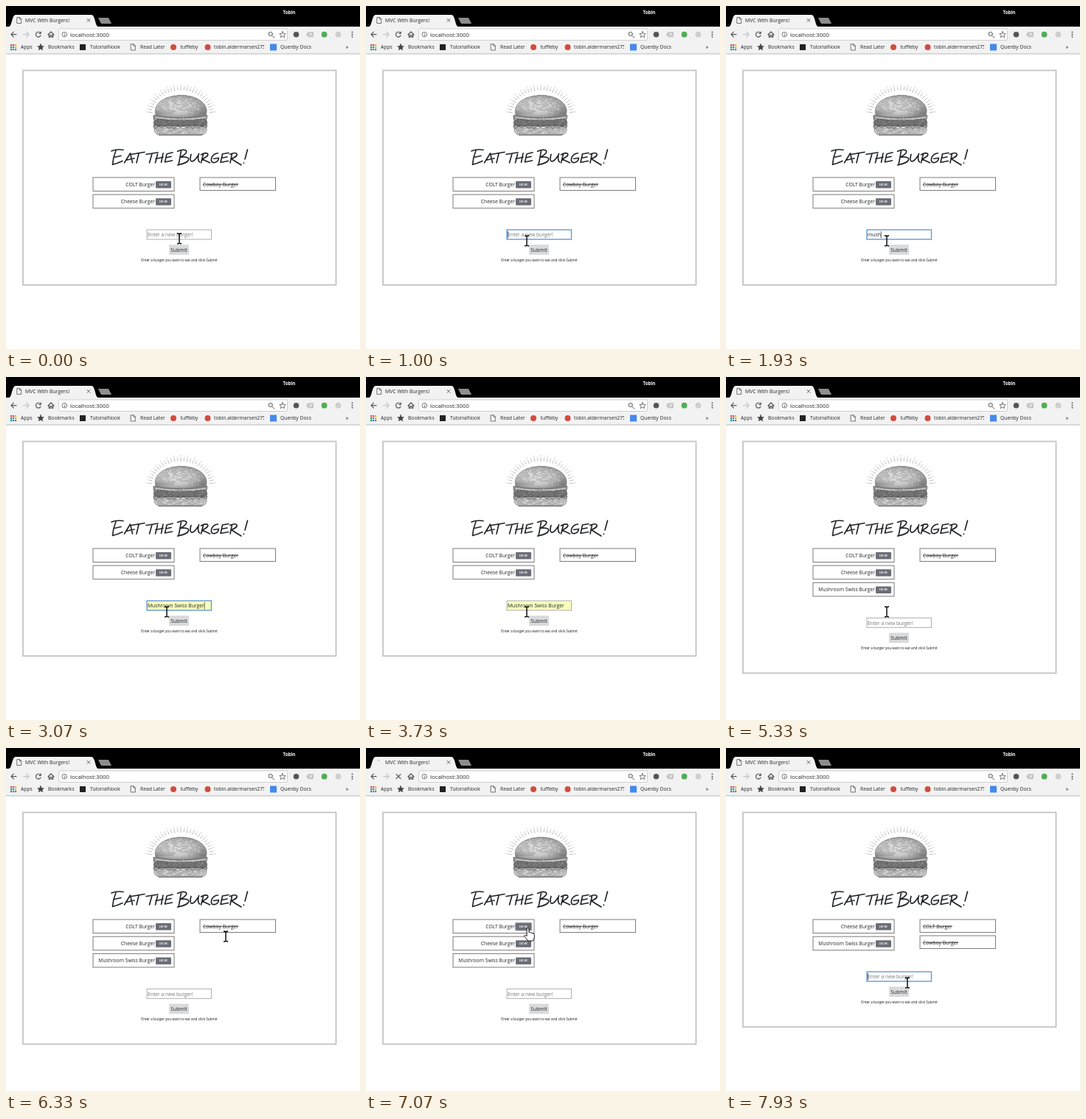
An HTML page that plays this animation: 480 px wide and 466 px high, repeating every 8000 ms.

```html
<!DOCTYPE html>
<html lang="en">
<head>
<meta charset="utf-8">
<title>MVC With Burgers!</title>
<style>
  html, body { margin: 0; width: 100%; height: 100%; overflow: hidden; background: #fff; }
  svg { display: block; width: 100vw; height: 100vh; }
  text { font-family: "Open Sans", "Noto Sans", sans-serif; font-size: 6.75px; fill: #24272b; }
  .line { fill: none; stroke: #555; stroke-width: 1.2; stroke-linecap: round; stroke-linejoin: round; }
  .item { fill: #fff; stroke: #7c7c7c; }
  .eat { font-size: 3.3px; font-weight: 600; fill: #fff; text-anchor: middle; }
  .struck { text-decoration: line-through; }
  .lettering { fill: none; stroke: #202327; stroke-width: 1.65; stroke-linecap: round; stroke-linejoin: round; }
</style>
</head>
<body>
<svg id="stage" viewBox="0 0 480 466" preserveAspectRatio="none">
  <defs>
    <radialGradient id="bun" cx=".42" cy=".45" r=".62">
      <stop offset="0" stop-color="#eee"/><stop offset=".6" stop-color="#c4c4c4"/><stop offset="1" stop-color="#858585"/>
    </radialGradient>
    <clipPath id="accountClip"><rect x="280" y="48" width="70" height="16"/></clipPath>
  </defs>

  <g id="browser">
    <rect width="480" height="28" fill="#000"/>
    <text x="375.5" y="11.2" style="font-size:6.2px;font-weight:700;fill:#fff">Tobin</text>
    <path d="M4 28C8 28 8 12 13 12H116C121 12 121 28 125 28Z" fill="#f2f2f2"/>
    <path d="M125 16H139L143 24H129Z" fill="#8d8d8d"/>
    <path class="line" d="M110 17.4l4 4m0-4l-4 4" style="stroke-width:.9"/>
    <text x="26" y="22" style="font-size:6.9px">MVC With Burgers!</text>
    <rect y="28" width="480" height="37" fill="#f2f2f2"/>
    <path d="M0 65H480" stroke="#b9b9b9"/>
    <path class="line" d="M14 38.7H7m3.3-3.5L7 38.7l3.3 3.5"/>
    <path class="line" d="M24 38.7H31m-3.3-3.5l3.3 3.5-3.3 3.5" style="stroke:#c4c4c4"/>
    <path class="line" d="M57 39l4-4 4 4M58.3 38.5V42.3H60v-2.6h2v2.6h1.7V38.5"/>
    <rect x="71.500" y="31" width="310" height="15.500" rx="1.500" fill="#fff" stroke="#c6c6c6" stroke-width=".8"/>
    <circle class="line" cx="79.300" cy="38.700" r="3.300" style="stroke-width:.8"/>
    <path class="line" d="M79.3 38.6V40.6M79.3 36.8v.1" style="stroke-width:.9"/>
    <text x="87" y="41.500" style="font-size:7.85px">localhost:3000</text>
    <path class="line" d="M361 40.500l3 2.700M361.300 38a2.600 2.600 0 1 1-5.200 0a2.600 2.600 0 1 1 5.200 0" style="stroke-width:1"/>
    <path id="star" class="line" d="M375 34.600l1.200 2.900 3 .2-2.300 2 .8 3-2.700-1.700-2.700 1.700.8-3-2.300-2 3-.2Z" style="stroke-width:.8"/>
    <circle cx="393.500" cy="38.700" r="3.800" fill="#555"/>
    <path d="M407 38.700l3-3.500h7v7h-7Z" fill="#c3c3c3"/>
    <path d="M411.500 37l3.400 3.400m0-3.400l-3.400 3.400" stroke="#fff"/>
    <circle cx="431.600" cy="38.700" r="3.900" fill="#50ad55"/>
    <circle cx="450.500" cy="38.700" r="3.900" fill="#cfcfcf"/>
    <g fill="#555"><circle cx="469.500" cy="35.600" r="1"/><circle cx="469.500" cy="38.700" r="1"/><circle cx="469.500" cy="41.800" r="1"/></g>
    <g id="apps"></g>
    <use href="#star" transform="translate(-328 17)"/>
    <path d="M47 51.600l1.200 2.900 3 .2-2.300 2 .8 3-2.700-1.700-2.700 1.700.8-3-2.300-2 3-.2Z" fill="#444"/>
    <rect x="100" y="52" width="8" height="8" fill="#222"/>
    <circle cx="227" cy="56" r="4" fill="#d34b3f"/>
    <circle cx="273.500" cy="56" r="4" fill="#d34b3f"/>
    <rect x="358" y="51.500" width="9" height="9" fill="#4688ee"/>
    <path class="line" d="M169.500 51.800H173L175.300 54V60H169.500ZM173 51.800V54h2.300" style="stroke-width:.8"/>
    <text x="20" y="58.400">Apps</text>
    <text x="57" y="58.400">Bookmarks</text>
    <text x="114" y="58.400">TutorialNook</text>
    <text x="182" y="58.400">Read Later</text>
    <text x="236.500" y="58.400">tuffleby</text>
    <text x="282" y="58.400" clip-path="url(#accountClip)">tobin.aldermarsen275</text>
    <text x="372" y="58.400">Quenby Docs</text>
    <text x="460.500" y="58.400" style="font-size:8px">»</text>
    <g id="idle">
      <path class="line" d="M15.200 15.500H18.500L20.700 17.700V23.500H15.200ZM18.500 15.500v2.200h2.200" style="stroke-width:.8"/>
      <path class="line" d="M46.600 36.600A3.400 3.400 0 1 0 47 40M47.200 35V37.500H44.700"/>
    </g>
    <g id="busy">
      <path id="spinner" class="line" d="M16.200 17.200A3 3 0 0 1 18 16.300" style="stroke:#8c8c8c;stroke-width:.8"/>
      <path class="line" d="M41 35.700l6 6m0-6l-6 6"/>
    </g>
  </g>

  <rect id="panel" x="23" y="87.500" width="424.500" height="291.500" fill="none" stroke="#c1c1c1" stroke-width="1.700"/>
  <g id="burger"></g>
  <g class="lettering" role="img" aria-label="Eat the Burger!">
    <path d="M143 197Q150 194 159 195.500M149 196.500Q145 206 144.500 215.500Q151 214 158 210.500M147 205.500L156 203.500"/>
    <path d="M160.500 213L168.500 200L171.500 213M162.500 209.500L174 207M170 201.500L188 198.500M180 200.500L177 213"/>
    <path d="M190 201.500L206 199M198 200.500L194.500 213M205.500 201L202.500 213M213 200L210.500 212.500M203 207.500L213 205.500"/>
    <path d="M226 199L218 201L215.500 212L225.500 210M217 206L224 204.500"/>
    <path d="M237.500 197L234 216M232.500 197.500C244 192 251 198 236.500 205.500C253 203 251 213 232.500 216"/>
    <path d="M251 201.500C247.500 213 253 215 260.500 203M261.500 200.500Q259 209 262.500 212"/>
    <path d="M267.500 201.500L264.500 213M264.500 202C275 196.500 278 203 266 208L276.500 213"/>
    <path d="M287.500 200C278 200 274.500 214.500 283.500 212.500Q288 211 288.500 206.500L281.500 207.500"/>
    <path d="M302 199.500L293.500 201L291 212.500L301.500 210.500M292.500 206.500L300 205"/>
    <path d="M306.500 200.500L304 213M303.500 201.500C315 196.500 317 203.500 305.500 207.500Q312 212 319 216M327.500 195L324 208M322.300 213.200L322.500 213.500"/>
  </g>
  <g id="lists"></g>

  <g id="form">
    <rect id="field" x="191" y="304" width="87.500" height="13"/>
    <text id="entry" x="192" y="313.400"></text>
    <path id="caret" d="M0 306V315.500" stroke="#222" stroke-width=".7"/>
    <rect id="submitGlow" x="219" y="322.500" width="31" height="17" rx="2.500" fill="#d3d7df"/>
    <rect x="221" y="324.300" width="27" height="13.700" rx="1.200" fill="#d9dadc"/>
    <text x="234.500" y="333.500" text-anchor="middle">Submit</text>
    <text x="235" y="346.600" text-anchor="middle" style="font-size:4.7px;fill:#111">Enter a burger you want to eat and click Submit</text>
  </g>

  <g id="pointer">
    <path id="beam" d="M-3-7Q-.5-7 0-6.200Q.5-7 3-7M0-6.200V6.200M-3 7Q-.5 7 0 6.200Q.5 7 3 7" fill="none" stroke="#000" stroke-width="1.400"/>
    <path id="arrow" d="M0 0V12.500L2.900 9.800 4.800 14 6.700 13.200 4.900 9H8.700Z" fill="#fff" stroke="#000" stroke-width=".8"/>
    <path id="hand" d="M-1.400 1.200Q0-1 1.400 1.200V6Q3 5 4 6.600Q5.600 5.900 6.500 7.400Q8.600 7 8.800 9.200V12Q8.500 15 7 17.500H0Q-2.500 13.500-5 11Q-4.500 8.500-1.400 11Z" fill="#fff" stroke="#000" stroke-width=".9" stroke-linejoin="round"/>
  </g>
</svg>

<script>
const LOOP = 8000;
const $ = id => document.getElementById(id);
const show = (id, on) => { $(id).style.display = on ? '' : 'none'; };
const set = (id, attrs) => { for (const k in attrs) $(id).setAttribute(k, attrs[k]); };

let seed = 11;
const rnd = (a = 0, b = 1) => {
  seed = (seed * 16807) % 2147483647;
  return a + (b - a) * seed / 2147483647;
};
const repeat = (n, fn) => Array.from({ length: n }, (_, i) => fn(i)).join('');

const appColors = ['#db4437', '#db4437', '#f4b400', '#0f9d58', '#4285f4', '#f4b400', '#0f9d58', '#4285f4', '#777'];
$('apps').innerHTML = appColors.map((c, i) =>
  `<rect x="${6 + i % 3 * 3}" y="${52 + Math.floor(i / 3) * 3}" width="2.200" height="2.200" fill="${c}"/>`).join('');

function drawBurger() {
  const stroke = (d, color, width) => `<path d="${d}" fill="none" stroke="${color}" stroke-width="${width}"/>`;
  const rays = repeat(29, i => {
    const a = Math.PI * (1.04 + i / 28 * 0.92);
    const at = r => `${237 + Math.cos(a) * (37 + r)} ${149 + Math.sin(a) * (32 + r)}`;
    return i % 2 ? stroke(`M${at(3)}L${at(7)}M${at(8)}L${at(9)}`, '#999', 0.7)
                 : stroke(`M${at(2)}L${at(8)}M${at(9.5)}L${at(11)}`, '#a3a3a3', 0.7);
  });
  const dome = '<path d="M203 148C199 134 213 121.500 238 121.500C262 121.500 276 135 271 148C255 153 220 153 203 148Z" fill="url(#bun)" stroke="#666" stroke-width=".7"/>';
  const shading = repeat(13, i => {
    const w = 33 - i * 1.8, h = 26 - i * 1.7;
    return `<path d="M${237 - w} 147A${w} ${h} 0 0 1 ${237 + w} 147" fill="none" stroke="#666" stroke-width=".45" stroke-dasharray="${rnd(5, 12)} ${rnd(1, 6)}"/>`;
  });
  const seeds = repeat(34, () => {
    const a = rnd(Math.PI * 1.1, Math.PI * 1.9), r = rnd(0.45, 0.92);
    return `<ellipse cx="${237 + Math.cos(a) * 31 * r}" cy="${148 + Math.sin(a) * 25 * r}" rx="1.300" ry=".8" fill="#f3f3f3" stroke="#777" stroke-width=".4"/>`;
  });
  const ruffle = (y, h, fill) => {
    let d = `M200 ${y}`;
    for (let x = 200; x <= 273; x += 1.5) d += `L${x} ${y + h + Math.sin(x * 0.75) * 1.5 + Math.sin(x * 0.23)}`;
    return `<path d="${d}L273 ${y}Q237 ${y + 2} 200 ${y}Z" fill="${fill}" stroke="#444" stroke-width=".6"/>`;
  };
  const patty = '<rect x="200" y="153" width="73" height="11" rx="5" fill="#707070"/>' + repeat(90, () => {
    const x = rnd(202, 271), y = rnd(154, 162);
    return stroke(`M${x} ${y}l${rnd(-1.5, 1.5)} ${rnd(0.5, 2)}`, rnd() < 0.5 ? '#444' : '#aaa', 0.6);
  });
  const base = '<path d="M201 164Q237 168 272 164Q273 175 264 175H209Q200 175 201 164Z" fill="#d2d2d2" stroke="#666" stroke-width=".7"/>' +
    repeat(7, i => `<path d="M${202 + i * 0.6} ${166 + i * 1.2}Q237 ${168.5 + i} ${271 - i * 0.6} ${166 + i * 1.2}" fill="none" stroke="#777" stroke-width=".45" stroke-dasharray="${rnd(6, 16)} ${rnd(2, 8)}"/>`) +
    stroke('M207 175.300H266', '#555', 0.9);
  $('burger').innerHTML = rays + base + patty + ruffle(162, 2.6, '#a5a5a5') + ruffle(148.5, 5.5, '#949494') +
    stroke('M203 151.500Q237 156.500 271 151.500', '#ddd', 1.1) + dome + shading + seeds;
}

const COLT = 'COLT Burger', CHEESE = 'Cheese Burger', COWBOY = 'Cowboy Burger', SWISS = 'Mushroom Swiss Burger';
const layouts = [
  { from: 0, fresh: [COLT, CHEESE], eaten: [COWBOY], drop: 0 },
  { from: 5270, fresh: [COLT, CHEESE, SWISS], eaten: [COWBOY], drop: 23.3 },
  { from: 7400, fresh: [CHEESE, SWISS], eaten: [COLT, COWBOY], drop: 0 }
];

function drawLists({ fresh, eaten, drop }) {
  $('lists').innerHTML = fresh.map((name, i) => `<g transform="translate(0 ${i * 23.2})">
      <rect class="item" x="118" y="233" width="110" height="18.500"/>
      <text x="202" y="244.800" text-anchor="end">${name}</text>
      ${i ? '' : '<rect id="eatGlow" x="202" y="236.800" width="23" height="11.700" rx="1.800" fill="#a3a7ad"/>'}
      <rect x="203" y="238" width="21" height="9.500" rx="1" fill="#6b6e76"/>
      <text class="eat" x="213.500" y="244">EAT ME</text></g>`).join('') +
    eaten.map((name, i) => `<g transform="translate(0 ${i * 22})">
      <rect class="item" x="263" y="233" width="102.500" height="17.500"/>
      <text class="struck" x="267" y="244.600">${name}</text></g>`).join('');
  set('panel', { height: 291.5 + drop });
  set('form', { transform: `translate(0 ${drop})` });
}

// time, x, y, shape
const pointerPath = [
  [0, 235, 316, 'beam'], [130, 235, 316, 'beam'], [470, 218, 319, 'beam'],
  [5840, 218, 319, 'beam'], [5860, 262, 298, 'arrow'], [5930, 285, 281, 'arrow'],
  [6060, 285, 281, 'arrow'], [6130, 306, 213, 'beam'], [6200, 306, 216, 'beam'],
  [6320, 298, 256, 'beam'], [6400, 298, 256, 'beam'], [6470, 278, 253, 'arrow'],
  [6700, 219.5, 244.5, 'hand'], [7180, 219.5, 244.5, 'hand'], [7230, 226, 260, 'arrow'],
  [7460, 273, 335, 'arrow'], [7660, 273, 335, 'arrow'], [7725, 246, 319, 'beam'], [LOOP, 246, 319, 'beam']
];

// time, text, focused, autofilled
const fieldSteps = [
  [0, '', false, false], [670, '', true, false],
  [1470, 'm', true, false], [1600, 'mu', true, false], [1730, 'mus', true, false], [1870, 'mush', true, false],
  [2870, SWISS, true, true], [3690, SWISS, false, true],
  [5270, '', false, false], [7900, '', true, false]
];

const latest = (steps, t) => steps.filter(s => s[0] <= t).pop();
const clamp = v => Math.max(0, Math.min(1, v));

function drawField(t) {
  const [since, value, focused, filled] = latest(fieldSteps, t);
  const entry = $('entry');
  const label = value || 'Enter a new burger!';
  if (entry.textContent !== label) entry.textContent = label;
  entry.style.fill = value ? '#24272b' : '#757575';
  set('field', {
    fill: filled ? '#faffbd' : '#fff',
    stroke: focused ? '#649bd8' : '#adadad',
    'stroke-width': focused ? 1.4 : 1
  });
  const caretX = 192.4 + (value ? entry.getComputedTextLength() : 0);
  set('caret', { transform: `translate(${caretX} 0)` });
  show('caret', focused && (t - since) % 1000 < 500);
}

function drawPointer(t) {
  const i = pointerPath.findIndex(p => p[0] > t);
  const [t0, x0, y0, shape] = pointerPath[i - 1], [t1, x1, y1] = pointerPath[i];
  const k = (t - t0) / (t1 - t0);
  set('pointer', { transform: `translate(${x0 + (x1 - x0) * k} ${y0 + (y1 - y0) * k})` });
  ['beam', 'arrow', 'hand'].forEach(s => show(s, s === shape));
}

let current;
function render(t) {
  const layout = layouts.filter(l => l.from <= t).pop();
  if (layout !== current) drawLists(current = layout);
  const busy = (t >= 4600 && t < 5290) || (t >= 6960 && t < 7430);
  show('busy', busy);
  show('idle', !busy);
  const turn = t < 6000 ? t - 5000 : t - 7070;
  set('spinner', { transform: `rotate(${-turn * 0.36} 18 19.300)` });
  show('eatGlow', t >= 6930 && t < 7400);
  $('submitGlow').style.opacity = t < 5270 ? clamp((t - 3730) / 150) : 0;
  drawField(t);
  drawPointer(t);
}

drawBurger();
const start = performance.now();
function tick() {
  render((performance.now() - start) % LOOP);
  requestAnimationFrame(tick);
}
tick();
</script>
</body>
</html>
```
